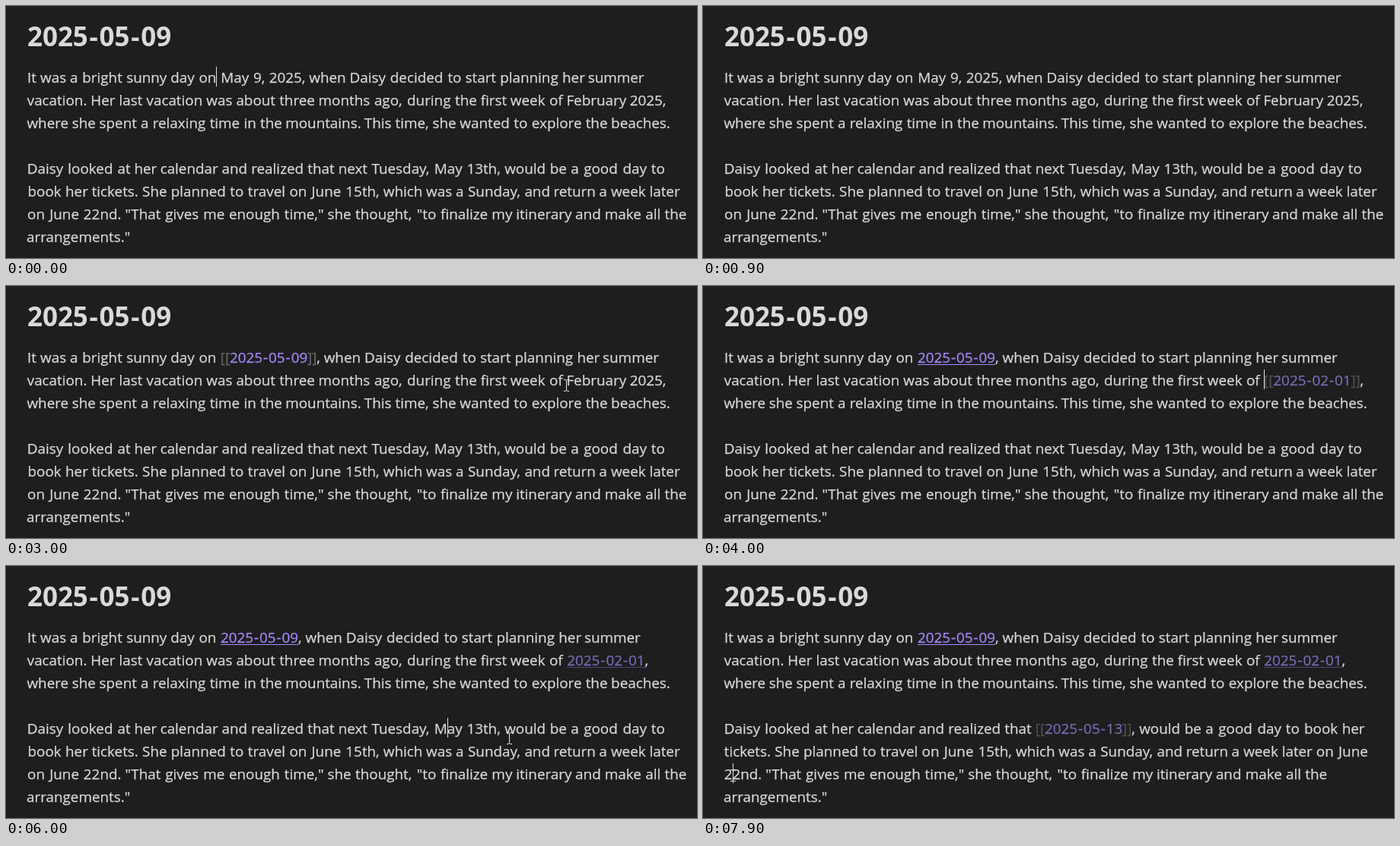
Write an HTML page that moves like this. It is 908 px wide and 332 px high and loops after 8 s.

```html
<!DOCTYPE html>
<html lang="en">
<head>
<meta charset="utf-8">
<title>Daily note</title>
<style>
  html, body { margin: 0; width: 100%; height: 100%; overflow: hidden; background: #1e1e1e; }
  svg { display: block; width: 908px; height: 332px; }
  text { font: 18.85px "Open Sans", "Noto Sans", sans-serif; color: #dadada; }
  text, tspan { fill: currentColor; stroke: currentColor; stroke-width: 0.25; }
  .title { font-size: 35px; font-weight: 700; }
  .title tspan { stroke: none; }
  .link { color: #a68af9; }
  .bracket { color: #666; }
  .missing .link { color: #7d6ab7; }
  .missing .bracket { color: #505050; }
  .rule { fill: #a68af9; }
  .missing .rule { fill: #54477c; }
  #caret { fill: #e4e4e4; }
  #mouse { fill: none; stroke: #e8e8e8; stroke-width: 1; }
</style>
</head>
<body>
<svg id="stage" viewBox="0 0 908 332">
  <rect id="caret" width="1" height="26"/>
  <path id="mouse" d="M-3 -7.5H-1L0.5 -6.5L2 -7.5H4M0.5 -6.5V6.5M-3 7.5H-1L0.5 6.5L2 7.5H4"/>
</svg>
<script>
const LOOP = 8000, LEFT = 28, FIRST = 101, PITCH = 30;
const TODAY = "2025-05-09";
const stage = document.getElementById("stage");
const caret = document.getElementById("caret");
const mouse = document.getElementById("mouse");

// Character advances in 1/2048 em; they set where each word sits.
const letters = "abcdefghijklmnopqrstuvwxyzDEFHIJMST .,\"[]-_";
const units = [1042, 1204, 946, 1206, 1071, 641, 1206, 1158, 496, 496, 1018, 496, 1764,
  1158, 1200, 1204, 1206, 711, 869, 694, 1158, 981, 1479, 940, 991, 926,
  1436, 1036, 999, 1454, 545, 731, 1839, 1087, 1073,
  561, 444, 444, 803, 618, 618, 819, 0];
const advance = c => units[letters.indexOf(c)] ?? 1104;
const width = (s, size = 20) => [...s].reduce((sum, c) => sum + advance(c), 0) * size / 2048;
const baseline = row => FIRST + PITCH * row;

function add(parent, tag, attrs, content = "") {
  const el = document.createElementNS("http://www.w3.org/2000/svg", tag);
  for (const k in attrs) el.setAttribute(k, attrs[k]);
  el.textContent = content;
  parent.appendChild(el);
  return el;
}

// [[date]] is an open link, _date_ a rendered one. Each word is centred in its slot.
function setLine(str, y, size, cls) {
  const g = add(stage, "g", {});
  const text = add(g, "text", { y, class: cls });
  let inLink = false, start = 0;
  for (const m of str.matchAll(/\[\[|\]\]|_|-|[^\s\[\]_-]+/g)) {
    const x = LEFT + width(str.slice(0, m.index), size);
    const tok = m[0], bracket = tok === "[[" || tok === "]]";
    if (bracket || tok === "_") {
      inLink = !inLink;
      if (inLink) start = x;
      if (tok === "_" && !inLink) {
        add(g, "rect", { x: start, y: y + 2, width: x - start, height: 1, class: "rule" });
      }
    }
    if (tok === "_") continue;
    const style = bracket ? "bracket" : inLink ? "link" : "";
    const span = add(text, "tspan", { x, class: style }, tok);
    span.setAttribute("x", x + (width(tok, size) - span.getComputedTextLength()) / 2);
    if (str[m.index + tok.length] === " ") span.append(" ");
  }
  if (/[\[_]/.test(str) && !str.includes(TODAY)) g.setAttribute("class", "missing");
  return g;
}

const opening = "It was a bright sunny day on ";
const plans = ", when Daisy decided to start planning her summer";
const lastTrip = "vacation. Her last vacation was about three months ago, during the first week of ";
const looked = "Daisy looked at her calendar and realized that ";

// row, from, to, text
const lines = [
  [0, 0, 1100, opening + "May 9, 2025" + plans],
  [0, 1100, 3200, opening + "[[" + TODAY + "]]" + plans],
  [0, 3200, LOOP, opening + "_" + TODAY + "_" + plans],
  [1, 0, 3900, lastTrip + "February 2025,"],
  [1, 3900, 5700, lastTrip + "[[2025-02-01]],"],
  [1, 5700, LOOP, lastTrip + "_2025-02-01_,"],
  [2, 0, LOOP, "where she spent a relaxing time in the mountains. This time, she wanted to explore the beaches."],
  [4, 0, 6500, looked + "next Tuesday, May 13th, would be a good day to"],
  [5, 0, 6500, "book her tickets. She planned to travel on June 15th, which was a Sunday, and return a week later"],
  [6, 0, 6500, "on June 22nd. \"That gives me enough time,\" she thought, \"to finalize my itinerary and make all the"],
  [4, 6500, LOOP, looked + "[[2025-05-13]], would be a good day to book her"],
  [5, 6500, LOOP, "tickets. She planned to travel on June 15th, which was a Sunday, and return a week later on June"],
  [6, 6500, LOOP, "22nd. \"That gives me enough time,\" she thought, \"to finalize my itinerary and make all the"],
  [7, 0, LOOP, "arrangements.\""]
].map(([row, from, to, str]) => ({ from, to, el: setLine(str, baseline(row), 20, "") }));

setLine(TODAY, 53, 37, "title");
stage.append(caret, mouse);

// Each caret placement restarts the blink: time, row, text before it.
const carets = [
  [-100, 0, opening.trim()],
  [1100, 0, opening],
  [3200, 1, lastTrip],
  [3900, 1, lastTrip],
  [5700, 4, looked + "next Tuesday, M"],
  [6500, 4, looked],
  [7900, 6, "2"]
].map(([at, row, before]) => ({ at, x: Math.round(LEFT + width(before)), y: baseline(row) - 21 }));

// The pointer hides while keys are pressed: one path per visible stretch.
const paths = [
  { until: 3900, pts: [[2700, 715, 345], [2800, 718, 300], [3000, 736, 131]] },
  { until: 6500, pts: [[4600, 736, 131], [5500, 580, 223], [5700, 580, 223], [6000, 661, 227], [6300, 734, 231]] },
  { until: LOOP, pts: [[7400, 734, 231], [7900, 39, 276]] }
];

function pointerAt(t) {
  const path = paths.find(p => t >= p.pts[0][0] && t < p.until);
  if (!path) return null;
  const i = path.pts.findLastIndex(p => p[0] <= t);
  const a = path.pts[i], b = path.pts[i + 1] || a;
  const k = a === b ? 0 : (t - a[0]) / (b[0] - a[0]);
  return [1, 2].map(n => Math.round(a[n] + (b[n] - a[n]) * k));
}

const show = (el, on) => { el.style.visibility = on ? "visible" : "hidden"; };

function draw(now) {
  const t = Math.floor(now % LOOP / 100) * 100;
  for (const l of lines) show(l.el, t >= l.from && t < l.to);

  const c = carets.findLast(c => c.at <= t);
  caret.setAttribute("x", c.x);
  caret.setAttribute("y", c.y);
  show(caret, (t - c.at) % 1200 < 600);

  const p = pointerAt(t);
  if (p) mouse.setAttribute("transform", `translate(${p[0]} ${p[1]})`);
  show(mouse, p);
}

let begin;
function tick(now) {
  begin ??= now;
  draw(Math.max(0, now - begin));
  requestAnimationFrame(tick);
}
draw(0);
requestAnimationFrame(tick);
</script>
</body>
</html>
```
